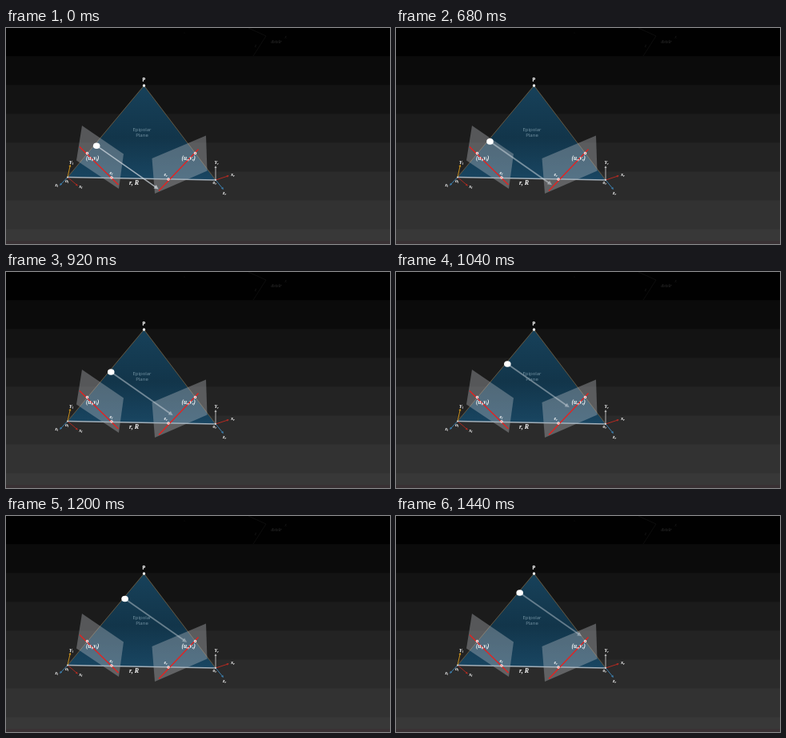
Animation, 480 px wide and 270 px high, one loop 1960 ms. Source, as an HTML page with a canvas:

```html
<!DOCTYPE html>
<html lang="en">
<head>
<meta charset="utf-8">
<title>Epipolar plane</title>
<style>
html, body { margin: 0; width: 100%; height: 100%; overflow: hidden; background: #000; }
canvas { display: block; width: 480px; height: 270px; }
</style>
</head>
<body>
<canvas id="stage" width="480" height="270"></canvas>
<script>
const ctx = document.getElementById('stage').getContext('2d');
const LOOP = 1960, STEP = 40, MOVE_START = 480, MOVE_TIME = 960;
const SERIF = '"Liberation Serif", serif';
const SANS = '"Open Sans", sans-serif';

const apex = [172.5, 72], leftEye = [77, 186.5], rightEye = [262, 190];
const leftPlane = [[95, 122], [147, 157.5], [141, 201], [88, 165.5]];
const rightPlane = [[182.5, 163], [250, 134.5], [251.5, 178.5], [186, 207]];

function path(points, close) {
  ctx.beginPath();
  points.forEach(([x, y]) => ctx.lineTo(x, y));
  if (close) ctx.closePath();
}

function polygon(points, fill) {
  path(points, true);
  ctx.fillStyle = fill;
  ctx.fill();
}

function line(points, color, width = 1) {
  path(points);
  ctx.strokeStyle = color;
  ctx.lineWidth = width;
  ctx.stroke();
}

function dot(x, y, rx, ry, fill) {
  ctx.beginPath();
  ctx.ellipse(x, y, rx, ry, 0, 0, Math.PI * 2);
  ctx.fillStyle = fill;
  ctx.fill();
}

function arrow([x0, y0], [x1, y1], color, width, head) {
  const angle = Math.atan2(y1 - y0, x1 - x0);
  const at = (back, side) => [
    x1 - back * Math.cos(angle) - side * Math.sin(angle),
    y1 - back * Math.sin(angle) + side * Math.cos(angle)
  ];
  line([[x0, y0], at(head * 0.8, 0)], color, width);
  polygon([[x1, y1], at(head, head * 0.5), at(head, -head * 0.5)], color);
}

function label(text, x, y, font, color = '#fff') {
  ctx.font = font;
  ctx.fillStyle = color;
  ctx.fillText(text, x, y);
}

function symbol(parts, x, y, size) {
  // Letters alternate between normal and subscript.
  ctx.textAlign = 'left';
  parts.forEach((part, i) => {
    const sub = i % 2;
    label(part, x, y + sub * size * 0.2, `italic bold ${size * (sub ? 0.65 : 1)}px ${SERIF}`);
    x += ctx.measureText(part).width;
  });
  ctx.textAlign = 'center';
}

function background() {
  const shades = [1, 11, 19, 27, 35, 43, 50, 56];
  shades.forEach((v, i) => {
    ctx.fillStyle = `rgb(${v},${v},${v})`;
    ctx.fillRect(0, i ? i * 36.1 - 1 : 0, 480, 38);
  });
  ctx.fillStyle = '#393134';
  ctx.fillRect(0, 266, 480, 4);

  line([[303, 0], [325, 10], [309, 35]], '#111', 0.8);
  label('dstslr', 338, 19, `italic bold 6px ${SERIF}`, '#222');
  label('x', 349.5, 13, `italic 6px ${SERIF}`, '#1b1b1b');
  label('z', 312, 24, `italic 6px ${SERIF}`, '#1b1b1b');
  dot(223, 6, 0.6, 0.6, '#151515');
}

function scene() {
  const blue = ctx.createLinearGradient(0, 72, 0, 190);
  blue.addColorStop(0, '#17415a');
  blue.addColorStop(0.55, '#12354a');
  blue.addColorStop(1, '#194662');
  polygon([apex, rightEye, leftEye], blue);
  line([leftEye, apex, rightEye], '#6b5d45', 0.9);

  polygon(leftPlane, 'rgba(190,194,200,0.36)');
  polygon(rightPlane, 'rgba(190,194,200,0.36)');
  line([leftEye, rightEye], '#a3b0ba', 1.3);

  line([[92, 148.5], [140.5, 196]], '#e8201e', 1.3);
  line([[191, 203.5], [240.5, 151.5]], '#e8201e', 1.3);
  [[101.5, 156.5], [132, 187], [203, 189], [236.5, 156.5]].forEach(([x, y]) => {
    dot(x, y, 1.7, 1.7, '#fff');
    dot(x, y, 0.7, 0.7, '#e8201e');
  });

  arrow(leftEye, [80.5, 170.5], '#c9911d', 1, 3);
  arrow(leftEye, [90, 197.5], '#a92a20', 1, 3);
  arrow(leftEye, [67, 197], '#3c7fae', 1, 3);
  arrow(rightEye, [262, 172], '#b5b5b5', 1, 3);
  arrow(rightEye, [279, 184.5], '#b52a22', 1, 3);
  arrow(rightEye, [272, 202], '#3c7fae', 1, 3);
  dot(...leftEye, 1, 1, '#ddd');
  dot(...rightEye, 1, 1, '#ddd');
}

function labels() {
  dot(...apex, 1.7, 1.7, '#fff');
  label('P', 172.3, 66.5, `bold 6.5px ${SANS}`);
  label('Epipolar', 170, 128.8, `6px ${SANS}`, '#7695a5');
  label('Plane', 170, 136.3, `6px ${SANS}`, '#7695a5');
  label('r, R', 160, 195.6, `italic bold 8px ${SERIF}`);

  symbol(['(u', 'l', ',v', 'l', ')'], 100, 164.5, 7.2);
  symbol(['(u', 'r', ',v', 'r', ')'], 219.5, 164.5, 7.2);
  symbol(['e', 'l'], 129.5, 182.5, 6);
  symbol(['e', 'r'], 197.5, 185, 6);
  symbol(['o', 'l'], 74, 192.5, 6);
  symbol(['o', 'r'], 258.5, 195, 6);
  symbol(['Y', 'l'], 79, 169.5, 6);
  symbol(['x', 'l'], 91.3, 199.7, 6);
  symbol(['z', 'l'], 61.5, 198.2, 6);
  symbol(['Y', 'r'], 260.5, 169.5, 6);
  symbol(['x', 'r'], 281, 184.8, 6.5);
  symbol(['z', 'r'], 271, 207.5, 6.5);
}

function ray(time) {
  const u = Math.min(1, Math.max(0, (time - MOVE_START) / MOVE_TIME));
  const eased = (1 - Math.cos(Math.PI * u)) / 2;
  const x = 113.2 + 41.5 * eased, y = 147.2 - 51.2 * eased;
  const resting = u === 0;
  ctx.save();
  ctx.globalAlpha = resting ? 0.72 : 0.52 - 0.1 * eased;
  arrow([x, y], [x + 77.5, y + 54.3], '#d5dce2', resting ? 1.5 : 1.9, 5.5);
  ctx.restore();
  dot(x, y, 4.3, 3.8, '#fff');
}

function draw(now) {
  const time = Math.floor((now % LOOP) / STEP) * STEP;
  ctx.textAlign = 'center';
  background();
  scene();
  ray(time);
  labels();
  requestAnimationFrame(() => draw(performance.now()));
}

draw(performance.now());
</script>
</body>
</html>
```
